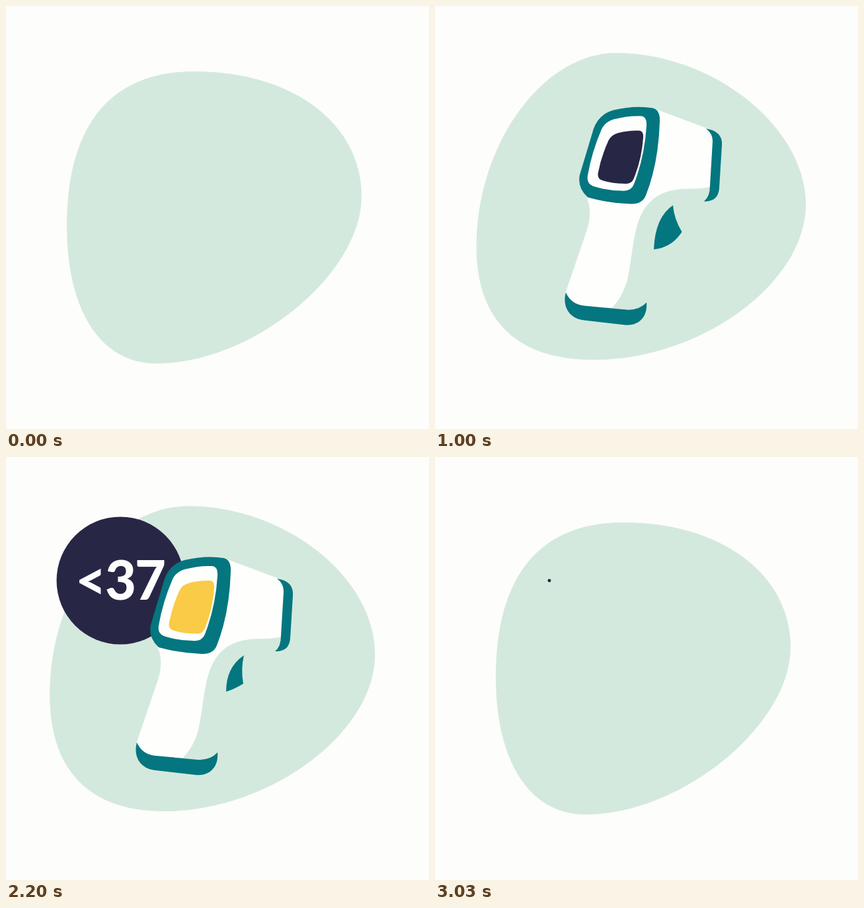
An HTML page that plays this animation: 640 px wide and 640 px high, repeating every 3.06 s.

```html
<!DOCTYPE html>
<html lang="en">
<head>
<meta charset="utf-8">
<title>Thermometer check</title>
<style>
  html, body { margin: 0; width: 100%; height: 100%; overflow: hidden; background: #fdfdfb; }
  svg { display: block; width: 100%; height: 100%; }
  .teal { fill: #04767f; }
  .white { fill: #fefefd; }
  .dark { fill: #282645; }
  text { font: 800 81px Lato, "Open Sans", sans-serif; letter-spacing: -2px; text-anchor: middle; }
</style>
</head>
<body>
<svg viewBox="0 0 640 640">
  <path id="blob" fill="#d4e9dd"/>
  <circle id="bubble" class="dark" r="96.5"/>
  <g id="label"><text id="count" class="white" y="29"></text></g>
  <g id="device">
    <path id="trigger" class="teal"/>
    <!-- body and handle -->
    <path class="white" d="M335 159 L410 187 Q420 191 420 205 L416 276 Q407 279 385 279
      C346 279 322 292 309 325 C299 352 298 384 292 412 Q287 438 268 459
      L222 456 Q197 449 198 435 L230 341 Q239 312 229 291 Z"/>
    <!-- sensor rim -->
    <path class="teal" d="M410 188 Q436 192 434 214 L430 279 Q428 299 407 298
      Q416 291 416 275 L420 209 Q421 196 410 188 Z"/>
    <!-- base cap -->
    <path class="teal" d="M198 436 Q206 454 226 456 L290 462 Q309 463 320 451
      C322 472 309 487 287 485 L226 478 C204 476 192 458 198 436 Z"/>
    <!-- bezel -->
    <path class="teal" d="M270 160 Q303 152 330 157 Q341 160 340 178 Q338 241 319 289
      Q314 302 297 302 Q264 301 231 292 Q215 277 219 258 L240 188 Q248 166 270 160 Z"/>
    <!-- the screen is the frame scaled down -->
    <path id="frame" class="white" d="M270 174 Q292 168 312 169 Q321 170 320 184 Q317 231 301 272
      Q297 283 283 282 Q261 282 239 275 Q229 271 231 259 Q237 224 252 189 Q257 178 270 174 Z"/>
    <path id="screen"/>
  </g>
</svg>
<script>
const LOOP = 3060;
const $ = id => document.getElementById(id);
const mix = (a, b, p) => a + (b - a) * p;
const clamp = x => Math.max(0, Math.min(1, x));

// Ease-in-out, a little steeper than a sine.
const ease = x => mix(x * x * (3 - 2 * x), x * x * x * (10 - 15 * x + 6 * x * x), .3);
const backOut = x => 1 + 2.7 * (x - 1) ** 3 + 1.7 * (x - 1) ** 2;

// Progress 0 to 1 of a move that begins at start and lasts dur.
const ramp = (t, start, dur, fn = ease) => fn(clamp((t - start) / dur));

// Outline through its top, right, bottom and left extremes; k is the roundness of each quarter.
const rest = { top: [285, 99], right: [538, 288], bottom: [228, 541], left: [92, 333], k: [.585, .465, .62, .655] };
const wide = { top: [269, 59], right: [571, 306], bottom: [246, 533], left: [50, 377], k: [.48, .52, .67, .47] };

function blobPath(p) {
  const at = side => rest[side].map((n, i) => mix(n, wide[side][i], p));
  const points = ["top", "right", "bottom", "left"].map(at);
  const k = at("k");
  let d = "M" + points[0];
  points.forEach(([x, y], i) => {
    const [u, v] = points[(i + 1) % 4];
    const [hx, hy] = [(u - x) * k[i], (v - y) * k[i]];
    d += i % 2 ? `C${x} ${y + hy} ${u - hx} ${v} ${u} ${v}` : `C${x + hx} ${y} ${u} ${v - hy} ${u} ${v}`;
  });
  return d;
}

// The tip and foot of the trigger draw back when it is pulled.
function triggerPath(p) {
  const tip = [mix(374, 359, p), mix(344, 347, p)];
  const foot = [mix(331, 333, p), mix(371, 359, p)];
  return `M360 304 Q${mix(362, 355, p)} 325 ${tip}
    Q${tip[0] - 15} ${foot[1] - 3} ${foot} Q333 322 360 304 Z`;
}

function place(id, x, y, scale) {
  $(id).setAttribute("transform", `translate(${x} ${y}) scale(${scale})`);
  $(id).style.display = scale > .002 ? "" : "none";
}

function render(t) {
  const swell = 1 - Math.abs(t - LOOP / 2 - 30) / 1500;
  $("blob").setAttribute("d", blobPath(ease(clamp(swell))));
  $("trigger").setAttribute("d", triggerPath(ramp(t, 960, 360)));

  const size = ramp(t, 30, 430, backOut) - ramp(t, 2700, 300);
  const lift = ramp(t, 430, 320) - ramp(t, 750, 420) + ramp(t, 1850, 650);
  place("device", 320 * (1 - size), 320 * (1 - size) - 7 * lift, size);
  $("screen").setAttribute("fill", t < 1060 ? "#282645" : "#f9cb46");

  place("bubble", 173, 187, ramp(t, 1000, 300) - ramp(t, 2790, 270));
  place("label", 172.5, 186.5, ramp(t, 1145, 300) - ramp(t, 2700, 270));
  $("count").textContent = "<" + Math.floor(mix(29, 37, clamp((t - 1200) / 720)));
}

$("screen").setAttribute("d", $("frame").getAttribute("d"));
$("screen").setAttribute("transform", "translate(280.5 231.5) scale(.767 .71) translate(-275 -226)");

const start = performance.now();
function frame() {
  render((performance.now() - start) % LOOP);
  requestAnimationFrame(frame);
}
render(0);
requestAnimationFrame(frame);
</script>
</body>
</html>
```
